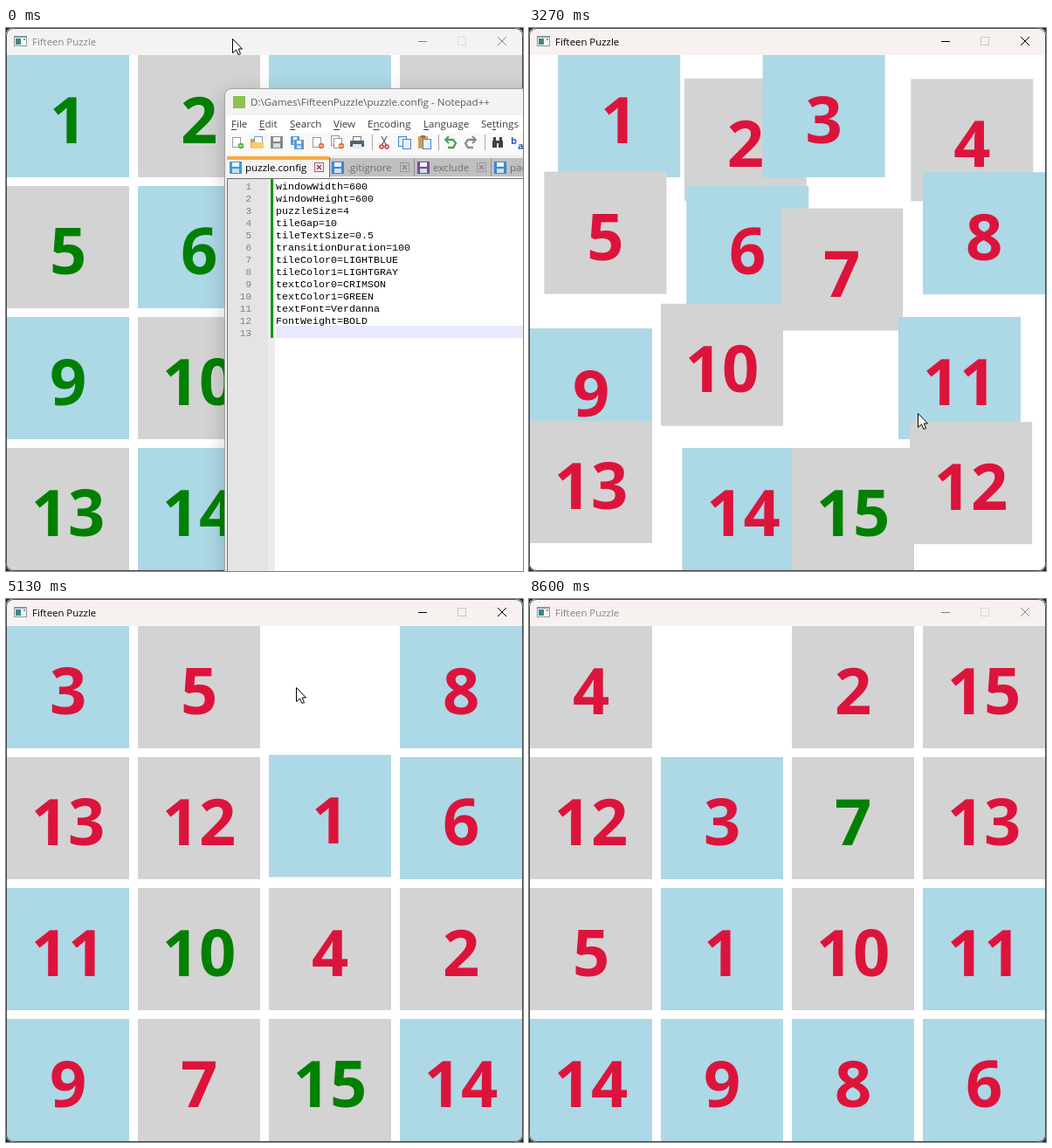
Animation of 592 by 622 pixels, one loop 9.54 s. Source, as an HTML page with a canvas:

```html
<!DOCTYPE html>
<html lang="en">
<head>
<meta charset="utf-8">
<title>Fifteen Puzzle</title>
<style>
html, body { margin: 0; width: 100%; height: 100%; overflow: hidden; background: #20242c; }
canvas { display: block; }
</style>
</head>
<body>
<canvas id="stage" width="592" height="622"></canvas>
<script>
const ctx = document.getElementById('stage').getContext('2d');
const LOOP = 9540, STEP = 200 / 3;
const TILE = 140, PITCH = 150, SLIDE = 100, SHUFFLE = 500, TRAVEL = 200;
const UI = '"Open Sans", "Noto Sans", sans-serif';
const MONO = '"Liberation Mono", "DejaVu Sans Mono", monospace';
const SMALL = `11.6px ${UI}`;

// Each event is [start, tile to slide] or [start, new board order].
const EVENTS = [
  [2070, 12], [2475, 11],
  [3211, [3, 5, 1, 8, 13, 10, 12, 6, 0, 11, 4, 2, 9, 7, 15, 14]],
  [3925, 11], [4183, 10], [4440, 12], [5035, 1], [5450, 5], [5840, 12],
  [6150, 1], [6440, 4], [6590, 10],
  [6702, [4, 0, 2, 15, 12, 3, 7, 13, 5, 1, 10, 11, 14, 9, 8, 6]]
];

// Pointer stops: arrival time, x, y.
const STOPS = [
  [1660, 505, 601], [2000, 500, 420], [2400, 388, 421], [2730, 445, 441],
  [3730, 366, 405], [3920, 230, 390], [4170, 245, 270], [4266, 306, 252],
  [4733, 243, 97], [4933, 332, 101], [5400, 235, 105], [5733, 225, 235],
  [6066, 383, 262], [6333, 370, 411], [6600, 225, 425], [7400, 496, 127],
  [7700, 570, 54]
];

const clamp = v => Math.max(0, Math.min(1, v));
const mix = (a, b, k) => a + (b - a) * k;

function box(x, y, w, h, color) {
  ctx.fillStyle = color;
  ctx.fillRect(x, y, w, h);
}

function frame(x, y, w, h, color) {
  ctx.strokeStyle = color;
  ctx.lineWidth = 1;
  ctx.strokeRect(x + .5, y + .5, w - 1, h - 1);
}

function line(points, color, width = 1) {
  ctx.strokeStyle = color;
  ctx.lineWidth = width;
  ctx.beginPath();
  for (const [x, y] of points) ctx.lineTo(x, y);
  ctx.stroke();
}

function ring(x, y, r, color, width = 1.5) {
  ctx.strokeStyle = color;
  ctx.lineWidth = width;
  ctx.beginPath();
  ctx.arc(x, y, r, 0, 7);
  ctx.stroke();
}

function text(str, x, y, color, font, align = 'left') {
  ctx.font = font;
  ctx.fillStyle = color;
  ctx.textAlign = align;
  ctx.fillText(str, x, y);
}

function textWidth(str, font) {
  ctx.font = font;
  return ctx.measureText(str).width;
}

function cross(x, y, r, color, width = 1) {
  line([[x - r, y - r], [x + r, y + r]], color, width);
  line([[x + r, y - r], [x - r, y + r]], color, width);
}

// Replays the events up to time t.
function boardAt(t) {
  const tiles = [];
  for (let n = 1; n < 16; n++) tiles[n] = { cell: n - 1, from: n - 1, start: 0, dur: 1 };
  let blank = 15;
  const move = (n, cell, start, dur) => {
    tiles[n] = { from: tiles[n].cell, cell, start, dur };
  };
  for (const [start, what] of EVENTS) {
    if (t < start) break;
    if (Array.isArray(what)) {
      what.forEach((n, cell) => n && move(n, cell, start + cell, SHUFFLE));
      blank = what.indexOf(0);
    } else {
      const old = tiles[what].cell;
      move(what, blank, start, SLIDE);
      blank = old;
    }
  }
  return tiles;
}

function drawTiles(t) {
  boardAt(t).forEach(({ cell, from, start, dur }, n) => {
    const home = n - 1, k = clamp((t - start) / dur);
    const x = 1 + PITCH * mix(from % 4, cell % 4, k);
    const y = 31 + PITCH * mix(from >> 2, cell >> 2, k);
    box(x, y, TILE, TILE, (home % 4 + (home >> 2)) % 2 ? 'lightgray' : 'lightblue');
    text(n, x + TILE / 2, y + 101, cell === home ? 'green' : 'crimson', `bold 74px ${UI}`, 'center');
  });
}

function drawPuzzle(t) {
  const active = t >= 1260 && t < 8590;
  const ink = active ? '#000' : '#858585';
  box(0, 0, 592, 622, '#20242c');
  ctx.save();
  ctx.beginPath();
  ctx.roundRect(0, 0, 592, 622, 8);
  ctx.clip();
  box(0, 0, 592, 622, '#fff');
  box(0, 0, 592, 31, t < 1260 ? '#f3f3f3' : '#f7f1f0');
  drawTiles(t);
  box(9, 9, 15, 12, '#8b9a9f');
  box(10, 11, 13, 9, '#f4f7f7');
  box(11, 12, 6, 7, '#3f8585');
  box(20, 12, 2, 2, '#7a9aa0');
  text('Fifteen Puzzle', 30, 20, ink, `11.4px ${UI}`);
  box(472, 15, 10, 1, ink);
  frame(517, 10, 10, 10, active ? '#c9c5c5' : '#dcdada');
  cross(568, 15, 5, ink);
  ctx.restore();
  ctx.strokeStyle = '#45464a';
  ctx.lineWidth = 1;
  ctx.beginPath();
  ctx.roundRect(.5, .5, 591, 621, 8);
  ctx.stroke();
}

function floppy(x, y, color, size = 14) {
  box(x, y, size, size, color);
  box(x + 3, y + 1, size - 6, size * .35, '#f2f6fa');
  box(x + 3, y + size * .58, size - 6, size * .42 - 1, '#cfe0ee');
}

function sheet(x, y, edge, fill = '#fff') {
  box(x, y, 10, 12, fill);
  frame(x, y, 10, 12, edge);
}

function badge(color) {
  ctx.fillStyle = color;
  ctx.beginPath();
  ctx.arc(4, 4, 3.2, 0, 7);
  ctx.fill();
  box(2, 3.5, 4, 1, '#fff');
}

function turn(dir, color) {
  line([[dir * 6, -3], [-dir * 3, -3], [-dir * 6, 1], [-dir * 3, 6], [dir * 3, 6]], color, 2.4);
  line([[dir * 2, -7], [dir * 6, -3], [dir * 2, 1]], color, 2);
}

function copies(back, front) {
  sheet(-7, -7, back, '#e4f0fd');
  sheet(-2, -4, front, '#e4f0fd');
}

// Toolbar icons around their own centre; null is a separator.
const ICONS = [
  () => { sheet(-6, -6, '#9a9a9a'); badge('#52b043'); },
  () => {
    box(-8, -4, 8, 10, '#e0a22c');
    sheet(-4, -7, '#6d9dcc');
    box(-7, 0, 14, 7, '#f8cf63');
  },
  () => floppy(-8, -7, '#888'),
  () => { floppy(-8, -7, '#5d9ad3', 10); floppy(-4, -3, '#5d9ad3', 11); },
  () => { sheet(-6, -6, '#9a9a9a'); badge('#e8722e'); },
  () => { sheet(-8, -8, '#9a9a9a'); sheet(-5, -5, '#9a9a9a'); badge('#e8722e'); },
  () => { sheet(-6, -7, '#777'); box(-9, -2, 16, 7, '#556270'); box(-6, 2, 10, 5, '#dcecf8'); },
  null,
  () => {
    for (const side of [-1, 1]) {
      line([[side * 3, -7], [-side * 3, 4]], '#777', 1.5);
      ring(side * 3, 5, 2, '#d33');
    }
  },
  () => copies('#4287cf', '#4287cf'),
  () => { box(-7, -7, 11, 14, '#d99b4d'); box(-4, -8, 5, 3, '#777'); sheet(-2, -4, '#4287cf', '#e4f0fd'); },
  null,
  () => turn(-1, '#4ba352'),
  () => turn(1, '#8c8c8c'),
  null,
  () => {
    for (const x of [-5, 2]) {
      box(x, -2, 5, 8, '#39424e');
      box(x + 1, -6, 3, 4, '#39424e');
    }
    box(-1, -2, 4, 3, '#39424e');
  },
  () => {
    text('b', -7, 2, '#2f5fae', `bold 11px ${UI}`);
    text('a', 1, 8, '#2f5fae', `bold 11px ${UI}`);
  },
  null,
  () => { ring(1, -2, 4.5, '#4f93cf', 2); line([[4, 1], [9, 7]], '#b47b3a', 2.5); }
];

function drawToolbar() {
  let x = 265;
  box(252, 120, 460, 25, '#f9f9f9');
  for (const icon of ICONS) {
    if (!icon) {
      box(x - 7, 122, 1, 18, '#a8a8a8');
      x += 7;
      continue;
    }
    ctx.save();
    ctx.translate(x, 131);
    icon();
    ctx.restore();
    x += 23;
  }
}

// An ampersand marks the underlined letter.
function drawMenu(ink) {
  let x = 258;
  box(252, 100, 460, 20, '#fff');
  for (const item of '&File &Edit &Search &View E&ncoding &Language Se&ttings T&ools'.split(' ')) {
    const at = item.indexOf('&'), name = item.replace('&', '');
    text(name, x, 114, ink, SMALL);
    box(x + textWidth(name.slice(0, at), SMALL), 116, textWidth(name[at], SMALL), 1, ink);
    x += Math.round(textWidth(name, SMALL)) + 14;
  }
}

function drawTabs() {
  const tabs = [['puzzle.config', '#3c9ad8'], ['.gitignore', '#3d87d2'],
    ['exclude', '#7a4f96'], ['package.json', '#3d87d2']];
  let x = 254;
  box(251, 145, 460, 27, '#f0f0f0');
  box(371, 149, 340, 21, '#c0c0c0');
  box(253, 147, 117, 4, '#faaa3c');
  box(253, 151, 117, 21, '#f3f3f3');
  box(370, 148, 1, 23, '#777');
  tabs.forEach(([name, color], i) => {
    const close = x + 34 + Math.round(textWidth(name, SMALL));
    floppy(x + 2, 153, color);
    text(name, x + 20, 164, i ? '#6c6c6c' : '#000', SMALL);
    frame(close - 5, 154, 11, 11, i ? '#999' : '#a65a78');
    cross(close + .5, 159.5, 2.5, i ? '#888' : '#a03565', 1.5);
    x = close + 13;
    if (i) box(x - 2, 149, 1, 21, '#929292');
  });
}

function drawEditor() {
  const lines = ['windowWidth=600', 'windowHeight=600', 'puzzleSize=4', 'tileGap=10',
    'tileTextSize=0.5', 'transitionDuration=100', 'tileColor0=LIGHTBLUE',
    'tileColor1=LIGHTGRAY', 'textColor0=CRIMSON', 'textColor1=GREEN',
    'textFont=Verdanna', 'FontWeight=BOLD', ''];
  box(253, 172, 460, 560, '#707070');
  box(254, 173, 460, 560, '#fff');
  box(254, 173, 46, 560, '#e4e4e4');
  box(300, 173, 8, 560, '#ececec');
  box(309, 341, 400, 14, '#e8e8ff');
  box(303, 173, 3, 182, '#0a9a0a');
  lines.forEach((str, i) => {
    const y = 184.5 + 14 * i;
    text(i + 1, 281, y, '#808080', `11px ${MONO}`, 'right');
    text(str, 309, y, '#000', `11.67px ${MONO}`);
  });
}

// The editor shrinks and drops away when minimised.
function drawNotepad(t) {
  if (t >= 1460) return;
  const k = clamp((t - 1210) / 190) ** 2;
  ctx.save();
  ctx.translate(251 + 11 * k, 69 + 102 * k);
  ctx.scale(1 - .12 * k, 1 - .12 * k);
  ctx.translate(-251, -69);
  ctx.beginPath();
  ctx.roundRect(250.5, 69.5, 480, 660, 8);
  ctx.save();
  ctx.shadowColor = 'rgba(0,0,0,.22)';
  ctx.shadowBlur = 24;
  ctx.shadowOffsetY = 6;
  ctx.fillStyle = '#f3f3f3';
  ctx.fill();
  ctx.restore();
  ctx.save();
  ctx.clip();
  box(260, 78, 14, 14, '#8fbf55');
  text('D:\\Games\\FifteenPuzzle\\puzzle.config - Notepad++', 280, 89, k ? '#8a8a8a' : '#5c5c5c', SMALL);
  drawMenu(k ? '#000' : '#3c3c3c');
  drawToolbar();
  drawTabs();
  drawEditor();
  ctx.restore();
  ctx.strokeStyle = '#a4a4a4';
  ctx.lineWidth = 1;
  ctx.beginPath();
  ctx.roundRect(250.5, 69.5, 480, 660, 8);
  ctx.stroke();
  ctx.restore();
}

function pointerAt(t) {
  if (t < 660) {
    const k = clamp((t - 30) / 570);
    return [mix(259, 498, k), mix(12, 234, k)];
  }
  const i = STOPS.findIndex(stop => stop[0] >= t);
  if (i < 1) return null;
  const [t0, x0, y0] = STOPS[i - 1], [t1, x1, y1] = STOPS[i];
  const span = Math.min(TRAVEL, t1 - t0);
  const k = clamp((t - t1 + span) / span);
  return [mix(x0, x1, k), mix(y0, y1, k)];
}

function drawPointer(t) {
  const at = pointerAt(t);
  if (!at) return;
  ctx.save();
  ctx.translate(Math.round(at[0]) + .5, Math.round(at[1]) + .5);
  ctx.beginPath();
  for (const [x, y] of [[0, 0], [0, 16], [4, 12.5], [6.5, 18], [9, 17], [6.7, 11.5], [11, 11.5]])
    ctx.lineTo(x, y);
  ctx.closePath();
  ctx.fillStyle = '#fff';
  ctx.fill();
  ctx.strokeStyle = '#000';
  ctx.lineWidth = 1;
  ctx.stroke();
  ctx.restore();
}

// The picture changes 15 times a second.
function render() {
  const t = Math.floor((performance.now() % LOOP + 4) / STEP) * STEP;
  drawPuzzle(t);
  drawNotepad(t);
  drawPointer(t);
  requestAnimationFrame(render);
}
render();
</script>
</body>
</html>
```
